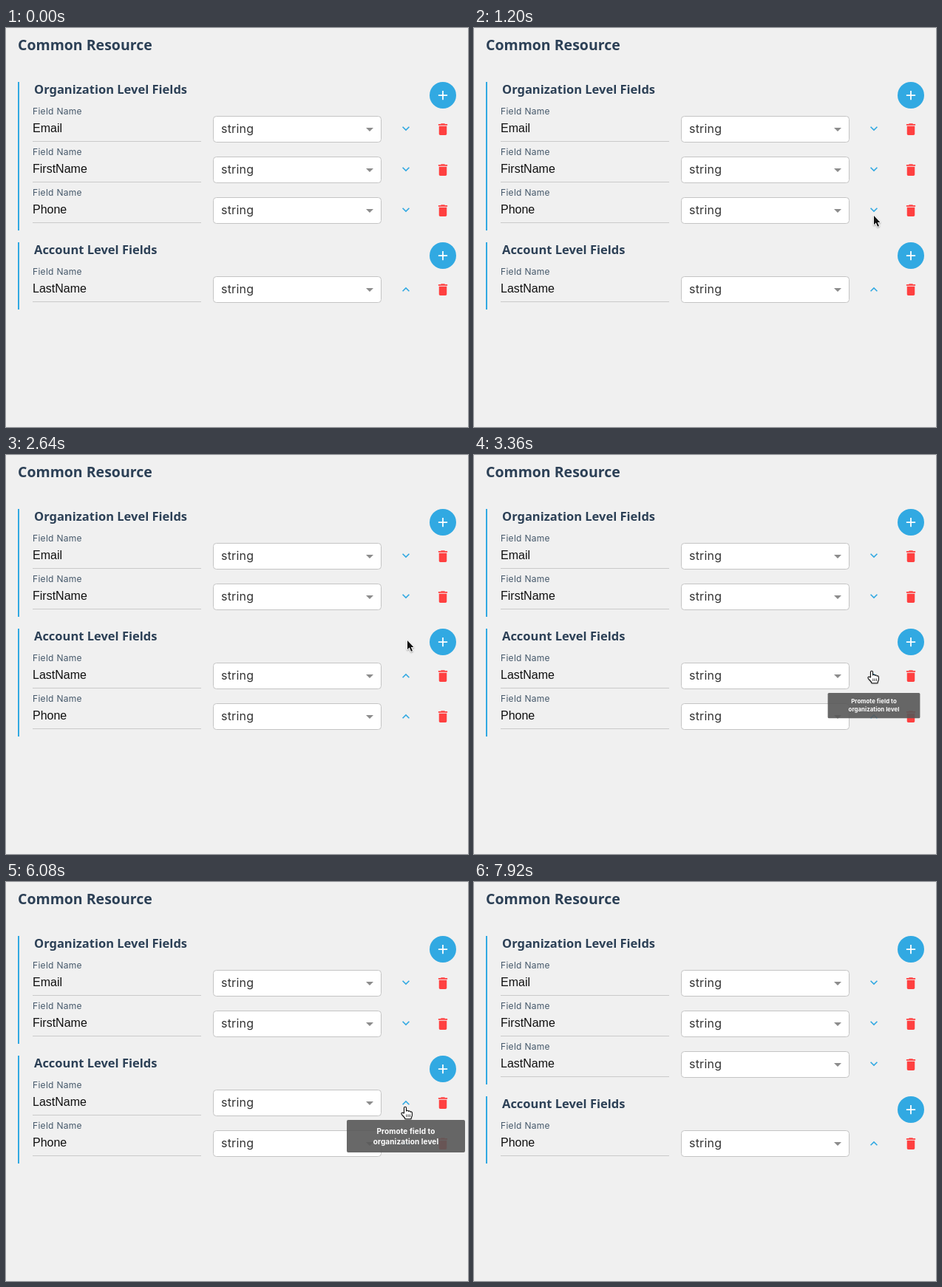
Animation of 625 by 540 pixels, one loop 8320 ms. Source, as an HTML page with a canvas:

```html
<!DOCTYPE html>
<html lang="en">
<head>
<meta charset="utf-8">
<title>Common Resource</title>
<style>
  html, body { margin: 0; height: 100%; overflow: hidden; background: #f0f0f0; }
  canvas { display: block; }
</style>
</head>
<body>
<canvas id="stage" width="625" height="540"></canvas>
<script>
const ctx = document.getElementById('stage').getContext('2d');
const LOOP = 8320, STEP = 80;
const BLUE = '#31a9e2', NAVY = '#2c4056', RED = '#ff4040';
const HEADING = '"Noto Sans", sans-serif', LABEL = 'Inter, sans-serif';
const INPUT = '"Liberation Sans", Arial, sans-serif';

const icons = {
  down: new Path2D('M16.59 8.59L12 13.17 7.41 8.59 6 10l6 6 6-6z'),
  up: new Path2D('M12 8l-6 6 1.41 1.41L12 10.83l4.59 4.58L18 14z'),
  trash: new Path2D('M6 19c0 1.1.9 2 2 2h8c1.1 0 2-.9 2-2V7H6zM19 4h-3.5l-1-1h-5l-1 1H5v2h14z'),
  plus: new Path2D('M19 13h-6v6h-2v-6H5v-2h6V5h2v6h6z')
};
const arrow = new Path2D('M1 1V13.2L3.8 10.6 6 15.8 8 14.9 5.8 9.9H9.4Z');
const hand = new Path2D('M-1.5 9V1.8a1.5 1.5 0 0 1 3 0V6c.3-1.2 2.8-1 3 .5c.5-1 2.6-.8 2.7.8' +
  'c.6-.8 2.2-.5 2.2 1v3.2c0 2-1.4 2.8-1.4 5.2h-8c0-2.4-4.4-4.8-5-6.9c-.5-1.8 1.8-2.2 2.5-1Z');
const fingers = new Path2D('M1.8 10.5v3.5M4.1 10.5v3.5M6.4 10.5v3.5');

// Pointer stops: time, x, y
const stops = [
  [320, 557, 441], [1120, 540, 254], [1200, 540, 253], [1440, 540, 253], [1520, 542, 250],
  [3040, 542, 250], [3360, 538, 292], [4000, 538, 292], [4240, 540, 304],
  [7360, 540, 304], [7920, 534, 545]
];

const clamp = v => Math.min(1, Math.max(0, v));
const ramp = (t, from, to) => clamp((t - from) / (to - from));
const mix = (a, b, k) => a + (b - a) * k;

function text(str, x, y, font, color, spacing = 0) {
  ctx.font = font;
  ctx.letterSpacing = spacing + 'px';
  ctx.fillStyle = color;
  ctx.fillText(str, x, y);
}

function icon(name, x, y, size, color) {
  ctx.save();
  ctx.translate(x - size / 2, y - size / 2);
  ctx.scale(size / 24, size / 24);
  ctx.fillStyle = color;
  ctx.fill(icons[name]);
  ctx.restore();
}

function disc(x, y, color) {
  ctx.fillStyle = color;
  ctx.beginPath();
  ctx.arc(x, y, 18, 0, 7);
  ctx.fill();
}

function box(x, y, w, h, r) {
  ctx.beginPath();
  ctx.roundRect(x, y, w, h, r);
}

function fieldRow(y, name, direction, glow) {
  text('Field Name', 36, y + 8, '12px ' + LABEL, '#45586a', .3);
  text(name, 36, y + 32, '16px ' + INPUT, '#101010');
  ctx.fillStyle = '#cacaca';
  ctx.fillRect(36, y + 44, 228, 1);

  box(280.5, y + 10.5, 227, 35, 4);
  ctx.fillStyle = '#fff';
  ctx.fill();
  ctx.strokeStyle = '#c4c4c4';
  ctx.lineWidth = 1;
  ctx.stroke();
  text('string', 291, y + 33, '16px ' + LABEL, '#333', .2);
  ctx.fillStyle = '#8c8c8c';
  ctx.beginPath();
  ctx.moveTo(487, y + 26);
  ctx.lineTo(497, y + 26);
  ctx.lineTo(492, y + 31);
  ctx.fill();

  if (glow) disc(541, y + 28, `rgba(49,169,226,${.085 * glow})`);
  icon(direction, 541, y + (direction === 'down' ? 27 : 28), 20, BLUE);
  icon('trash', 591, y + 28, 21, RED);
}

function section(top, title, names, direction, glow) {
  ctx.fillStyle = BLUE;
  ctx.fillRect(16, top, 2, 36 + 55 * names.length);
  text(title, 38, top + 16, 'bold 16.5px ' + HEADING, NAVY);
  disc(591, top + 18, BLUE);
  icon('plus', 591, top + 18, 21, '#fff');
  names.forEach((name, i) => fieldRow(top + 36 + 55 * i, name, direction, glow));
}

function tooltip(t, opens, closes, top, lines) {
  const grow = t < opens + 80 ? .78 * ramp(t, opens, opens + 80) : mix(.78, 1, ramp(t, opens + 80, opens + 180));
  const shrink = 1 - ramp(t, closes - 40, closes + 160);
  const scale = grow * shrink;
  if (scale <= 0) return;
  ctx.save();
  ctx.translate(541, top);
  ctx.scale(scale, scale);
  ctx.globalAlpha = shrink;
  box(-80, 0, 160, 44, 2);
  ctx.fillStyle = 'rgba(88,88,88,.9)';
  ctx.fill();
  ctx.textAlign = 'center';
  lines.forEach((line, i) => text(line, 0, 18.5 + 14 * i, 'bold 10px ' + LABEL, '#fff', .1));
  ctx.restore();
}

function pointer(t) {
  if (t < stops[0][0] || t >= 7920) return;
  const next = stops.findIndex(s => s[0] > t);
  const [t0, x0, y0] = stops[next - 1], [t1, x1, y1] = stops[next];
  let k = ramp(t, t0, t1);
  if (next === 1) k = 1 - (1 - k) ** 2;
  else if (t1 === 7920) k *= k;
  const pointing = (t >= 1520 && t < 2480) || (t >= 3280 && t < 6160);

  ctx.save();
  ctx.translate(mix(x0, x1, k), mix(y0, y1, k));
  ctx.lineJoin = 'round';
  ctx.shadowColor = 'rgba(0,0,0,.35)';
  ctx.shadowBlur = 2;
  ctx.shadowOffsetY = 1;
  if (pointing) {
    ctx.fillStyle = '#fff';
    ctx.fill(hand);
    ctx.shadowColor = 'transparent';
    ctx.strokeStyle = '#111';
    ctx.lineWidth = 1.1;
    ctx.stroke(hand);
    ctx.lineWidth = .8;
    ctx.stroke(fingers);
  } else {
    ctx.strokeStyle = '#fff';
    ctx.lineWidth = 1.8;
    ctx.stroke(arrow);
    ctx.shadowColor = 'transparent';
    ctx.fillStyle = '#111';
    ctx.fill(arrow);
  }
  ctx.restore();
}

function draw(t) {
  ctx.fillStyle = '#f0f0f0';
  ctx.fillRect(0, 0, 625, 540);
  text('Common Resource', 16, 30, 'bold 19.5px ' + HEADING, NAVY);

  const shared = ['Email', 'FirstName'];
  let account = ['LastName'];
  if (t < 2480) shared.push('Phone');
  else if (t < 6160) account.push('Phone');
  else {
    shared.push('LastName');
    account = ['Phone'];
  }
  const glow = ramp(t, 6240, 6480) * (1 - ramp(t, 7360, 7920));
  section(73, 'Organization Level Fields', shared, 'down');
  section(125 + 55 * shared.length, 'Account Level Fields', account, 'up', glow);

  tooltip(t, 1520, 2480, 270, ['Demote field to account', 'level']);
  tooltip(t, 3280, 6160, 322, ['Promote field to', 'organization level']);
  pointer(t);
}

const start = performance.now();
function tick() {
  const t = (performance.now() - start) % LOOP;
  draw(Math.floor(t / STEP) * STEP);
  requestAnimationFrame(tick);
}
tick();
</script>
</body>
</html>
```
